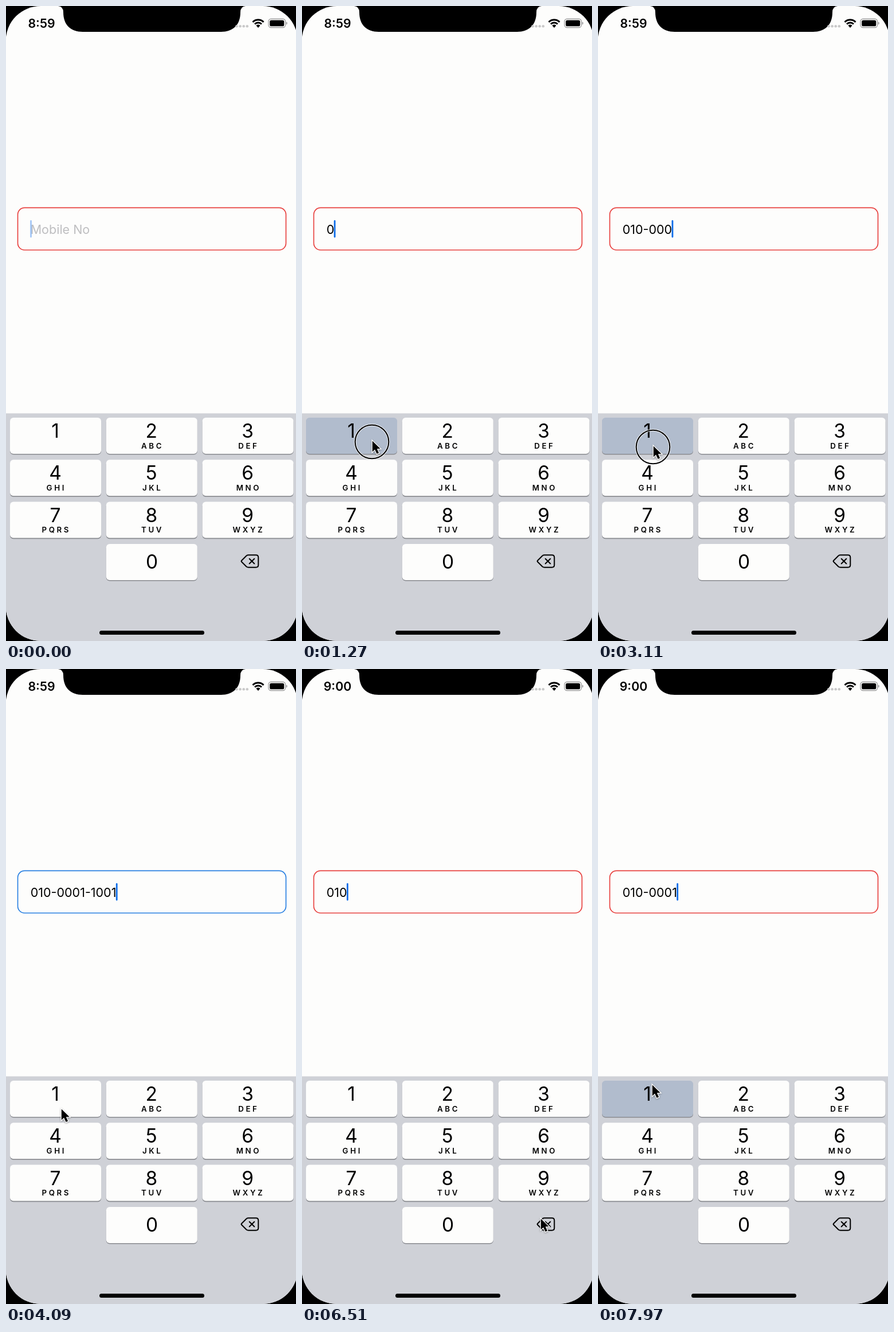
These frames come from a looping animation (506x1106 px, 7.99 s). An HTML page with a canvas:

```html
<!DOCTYPE html>
<html lang="en">
<head>
<meta charset="utf-8">
<title>Mobile number field</title>
<style>
html, body { margin: 0; width: 100%; height: 100%; overflow: hidden; background: #000; }
canvas { display: block; }
</style>
</head>
<body>
<canvas id="stage" width="506" height="1106"></canvas>
<script>
const ctx = document.getElementById('stage').getContext('2d');
const LOOP = 7990;
const MID = 254.5;
const PAPER = '#fdfdfc';
const NUMBER = '01000011001';
const FONT = 'Inter, Roboto, sans-serif';
const LETTERS = ['', 'ABC', 'DEF', 'GHI', 'JKL', 'MNO', 'PQRS', 'TUV', 'WXYZ'];

// Taps: [finger down, finger up, key]
const taps = [
  [760, 860, 0], [1200, 1310, 1], [1800, 1890, 0],
  ...[2480, 2700, 2920, 3150, 3350, 3550, 3750, 3950].map(t => [t - 80, t, 1]),
  ...[5000, 5250, 5560, 5720, 5880, 6040, 6200, 6360].map(t => [t, t + 80, 'del']),
  ...[7270, 7480, 7690, 7930].map(t => [t - 80, t, 1])
];

// Pointer stops: [time, x, y]
const stops = [
  [0, 560, 1010], [650, 262, 968], [870, 262, 968], [1150, 122, 759],
  [1330, 122, 759], [1740, 250, 966], [1910, 250, 966], [2350, 96, 768],
  [4250, 96, 768], [4880, 429, 967], [5500, 429, 967], [6200, 416, 959],
  [6600, 416, 959], [7150, 94, 726], [LOOP, 94, 726]
];

function pointerAt(t) {
  const i = Math.max(1, stops.findIndex(s => s[0] > t));
  const [t0, x0, y0] = stops[i - 1], [t1, x1, y1] = stops[i];
  const u = (t - t0) / (t1 - t0), e = u * u * (3 - 2 * u);
  return [x0 + (x1 - x0) * e, y0 + (y1 - y0) * e];
}

function stateAt(t) {
  let count = 0, last = -600, lit = null, down = false;
  for (const [on, off, key] of taps) {
    const acts = key === 'del' ? on : off;
    if (t >= acts) {
      count += key === 'del' ? -1 : 1;
      last = acts;
    }
    if (t >= on && t < off) down = true;
    if (t >= on && t < off + 80) lit = key;
  }
  const digits = NUMBER.slice(0, count);
  const text = [digits.slice(0, 3), digits.slice(3, 7), digits.slice(7)].filter(Boolean).join('-');
  return { count, last, lit, down, text };
}

function caretAlpha(idle) {
  const p = idle % 1000;
  if (p < 500) return 1;
  if (p < 660) return 1 - (p - 500) / 160;
  return Math.max(0, (p - 840) / 160);
}

function box(x, y, w, h, r, fill) {
  ctx.beginPath();
  ctx.roundRect(x, y, w, h, r);
  if (fill) {
    ctx.fillStyle = fill;
    ctx.fill();
  }
}

function label(str, x, y, size, weight = 400, color = '#000', align = 'center', gap = 0) {
  ctx.font = `${weight} ${size}px ${FONT}`;
  ctx.letterSpacing = gap + 'px';
  ctx.textAlign = align;
  ctx.fillStyle = color;
  ctx.fillText(str, x + gap / 2, y);
  ctx.letterSpacing = '0px';
}

function drawStatus(t) {
  ctx.fillStyle = '#000';
  ctx.beginPath();
  ctx.moveTo(91, 0);
  ctx.quadraticCurveTo(100, 1, 100, 11);
  ctx.bezierCurveTo(100, 33, 113, 45, 134, 45);
  ctx.lineTo(375, 45);
  ctx.bezierCurveTo(396, 45, 409, 33, 409, 11);
  ctx.quadraticCurveTo(409, 1, 418, 0);
  ctx.fill();

  label(t < 6000 ? '8:59' : '9:00', 62, 37.5, 21.3, 600);

  ctx.fillStyle = '#c9c9c9';
  for (let i = 0; i < 4; i++) {
    ctx.beginPath();
    ctx.arc(402.5 + i * 6.1, 35.3, 2.3, 0, 7);
    ctx.fill();
  }

  // Wi-Fi
  ctx.strokeStyle = ctx.fillStyle = '#000';
  ctx.lineWidth = 3;
  for (const r of [8.4, 13.4]) {
    ctx.beginPath();
    ctx.arc(440, 37.5, r, -Math.PI * 0.75, -Math.PI * 0.25);
    ctx.stroke();
  }
  ctx.beginPath();
  ctx.moveTo(440, 38);
  ctx.arc(440, 37.5, 5, -Math.PI * 0.75, -Math.PI * 0.25);
  ctx.fill();

  // Battery
  box(458, 22.5, 29.5, 15, 4.5);
  ctx.strokeStyle = '#9b9b9b';
  ctx.lineWidth = 1.3;
  ctx.stroke();
  box(460.2, 24.7, 25, 10.6, 2.6, '#000');
  box(488.8, 27.4, 1.8, 5.2, [0, 2, 2, 0], '#9b9b9b');
}

function drawField(t, s) {
  box(20.5, 351.3, 468, 73.7, 12);
  ctx.strokeStyle = s.count === NUMBER.length ? '#2980e2' : '#e8413f';
  ctx.lineWidth = 1.7;
  ctx.stroke();

  const x = 42.7;
  if (s.text) label(s.text, x, 397, 21.5, 400, '#000', 'left');
  else label('Mobile No', x, 397, 21.5, 400, '#bebec0', 'left');

  const w = s.text ? ctx.measureText(s.text).width : 0;
  ctx.globalAlpha = caretAlpha(t - s.last);
  box(x + w - 0.6, 373, 2.8, 30.5, 1.4, '#0b6be8');
  ctx.globalAlpha = 1;
}

function drawKey(n, lit) {
  const i = n ? n - 1 : 10;
  const x = 7 + (i % 3) * 167.8, y = 717 + Math.floor(i / 3) * 73.3;
  box(x, y + 1.6, 159, 63, 6, '#898b90');
  box(x, y, 159, 63, 6, lit ? '#b1bccd' : PAPER);
  const mid = n ? x + 79 : MID;
  label(String(n), mid, y + (n ? 35 : 43), 33.5);
  if (n > 1) label(LETTERS[n - 1], mid, y + 53.8, 13.3, 600, '#000', 'center', 3.6);
}

function drawDelete() {
  ctx.strokeStyle = '#000';
  ctx.lineWidth = 2;
  ctx.lineJoin = ctx.lineCap = 'round';
  ctx.beginPath();
  ctx.moveTo(411, 966);
  ctx.lineTo(419.5, 957.5);
  ctx.quadraticCurveTo(421, 956.3, 423, 956.3);
  ctx.lineTo(436, 956.3);
  ctx.quadraticCurveTo(440.3, 956.3, 440.3, 960.5);
  ctx.lineTo(440.3, 973.5);
  ctx.quadraticCurveTo(440.3, 977.7, 436, 977.7);
  ctx.lineTo(423, 977.7);
  ctx.quadraticCurveTo(421, 977.7, 419.5, 976.5);
  ctx.lineTo(411, 968);
  ctx.quadraticCurveTo(410, 967, 411, 966);
  ctx.moveTo(424.7, 962.7);
  ctx.lineTo(433.3, 971.3);
  ctx.moveTo(433.3, 962.7);
  ctx.lineTo(424.7, 971.3);
  ctx.stroke();
}

function drawPointer(x, y, down) {
  if (down) {
    ctx.beginPath();
    ctx.arc(x, y, 29.3, 0, 7);
    ctx.strokeStyle = 'rgba(255,255,255,.8)';
    ctx.lineWidth = 4;
    ctx.stroke();
    ctx.strokeStyle = '#000';
    ctx.lineWidth = 2;
    ctx.stroke();
  }
  const arrow = [[0, 0], [0, 19], [4.3, 15], [7.8, 22.6], [11.3, 21], [8, 13.8], [13.8, 13.6]];
  ctx.save();
  ctx.translate(x + 0.8, y - 1.5);
  ctx.beginPath();
  arrow.forEach(p => ctx.lineTo(...p));
  ctx.closePath();
  ctx.lineJoin = 'miter';
  ctx.strokeStyle = '#fff';
  ctx.lineWidth = 2.6;
  ctx.shadowColor = 'rgba(0,0,0,.35)';
  ctx.shadowBlur = 3;
  ctx.shadowOffsetY = 1;
  ctx.stroke();
  ctx.shadowColor = 'transparent';
  ctx.fillStyle = '#000';
  ctx.fill();
  ctx.restore();
}

function draw(t) {
  const s = stateAt(t);
  ctx.fillStyle = '#000';
  ctx.fillRect(0, 0, 506, 1106);
  ctx.save();
  box(-0.5, 0, 509.5, 1106, 61);
  ctx.clip();
  ctx.fillStyle = PAPER;
  ctx.fillRect(0, 0, 506, 1106);
  drawStatus(t);
  drawField(t, s);
  ctx.fillStyle = '#cfd1d7';
  ctx.fillRect(0, 709.5, 506, 397);
  for (let n = 0; n < 10; n++) drawKey(n, s.lit === n);
  drawDelete();
  box(163, 1088, 183, 7, 3.5, '#000');
  ctx.restore();
  drawPointer(...pointerAt(t), s.down);
}

const start = performance.now();
function tick() {
  draw((performance.now() - start) % LOOP);
  requestAnimationFrame(tick);
}
tick();
</script>
</body>
</html>
```
